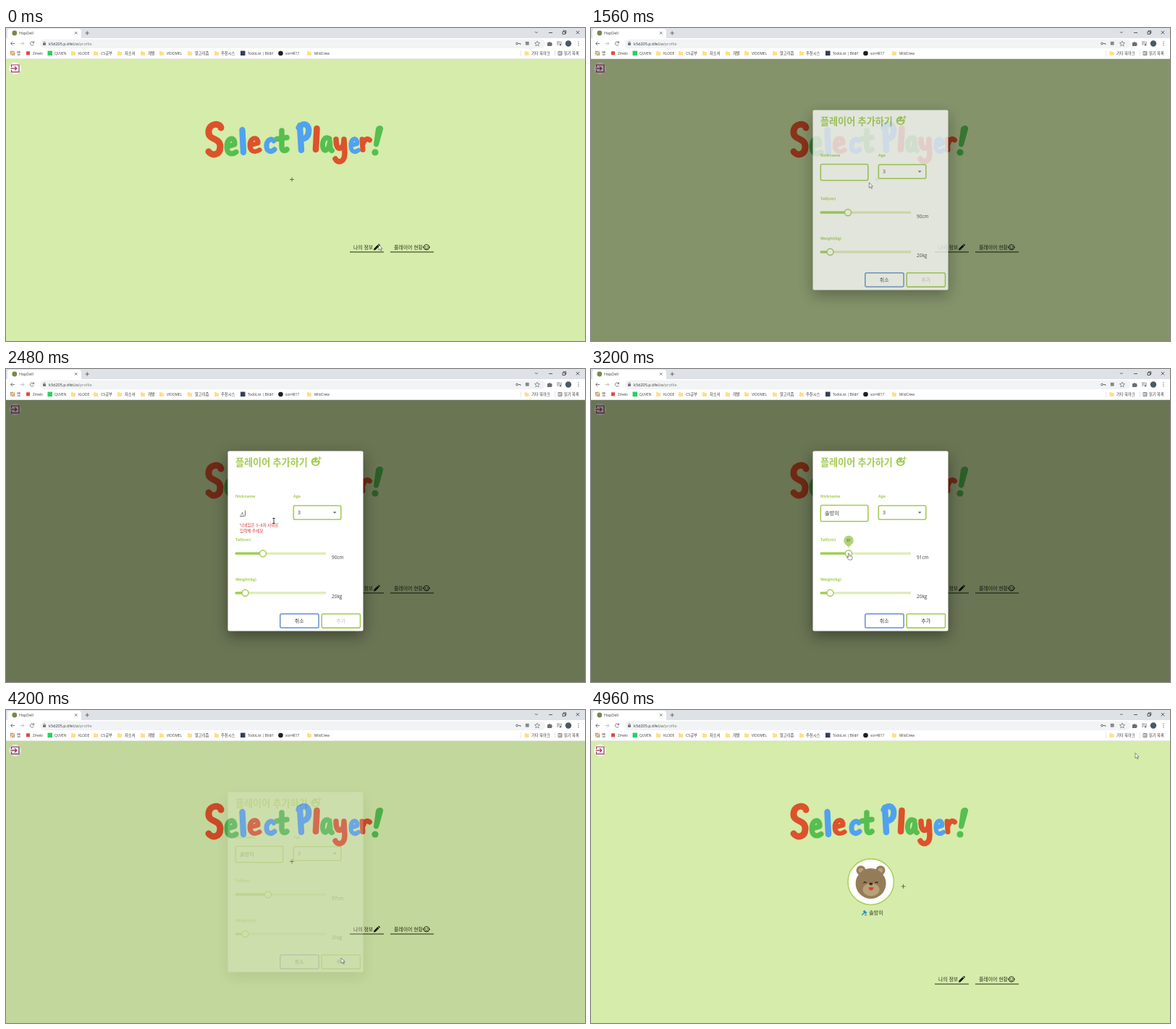
Write an HTML page with a canvas that moves like this. It is 800 px wide and 433 px high and loops after 5 s.

```html
<!DOCTYPE html>
<html lang="ko">
<head>
<meta charset="utf-8">
<title>Select Player</title>
<style>
html, body { margin: 0; width: 100%; height: 100%; overflow: hidden; background: #d5ecaa; }
canvas { display: block; width: 800px; height: 433px; }
</style>
</head>
<body>
<canvas id="stage" width="800" height="433"></canvas>
<script>
const LOOP = 5000, STEP = 40, W = 800, H = 433, TOP = 42.6;
const RED = '#dd522b', GREEN = '#57be50', BLUE = '#50a2ef';
const LIME = '#a2cc52', PALE = '#deecba', INK = '#3c3c3c', GREY = '#6b6f74';
const FONT = '"Open Sans", "Noto Sans CJK KR", "Noto Sans CJK JP", "Noto Sans CJK", sans-serif';
const NICK = '솔방이';

const screen = document.getElementById('stage').getContext('2d');
const layer = document.createElement('canvas');
layer.width = W;
layer.height = H;
const dialogCtx = layer.getContext('2d');
let c = screen;

const clamp = v => Math.max(0, Math.min(1, v));
const ease = v => { v = clamp(v); return v * v * (3 - 2 * v); };
const progress = (t, from, to) => clamp((t - from) / (to - from));

function text(s, x, y, size, color = INK, weight = 400, align = 'left') {
  c.font = `${weight} ${size}px ${FONT}`;
  c.textAlign = align;
  c.fillStyle = color;
  c.fillText(s, x, y);
}
function rect(x, y, w, h, color) { c.fillStyle = color; c.fillRect(x, y, w, h); }
function ellipse(x, y, rx, ry, color) {
  c.beginPath();
  c.ellipse(x, y, rx, ry, 0, 0, 7);
  c.fillStyle = color;
  c.fill();
}
const disc = (x, y, r, color) => ellipse(x, y, r, r, color);
function ring(x, y, r, color, width) {
  c.beginPath();
  c.arc(x, y, r, 0, 7);
  c.strokeStyle = color;
  c.lineWidth = width;
  c.stroke();
}
function stroke(d, color, width, cap = 'butt') {
  c.strokeStyle = color;
  c.lineWidth = width;
  c.lineCap = cap;
  c.lineJoin = cap === 'round' ? 'round' : 'miter';
  c.stroke(new Path2D(d));
}
function fill(d, color) { c.fillStyle = color; c.fill(new Path2D(d)); }
function box(x, y, w, h, radius, fillColor, line, width) {
  c.beginPath();
  c.roundRect(x, y, w, h, radius);
  if (fillColor) { c.fillStyle = fillColor; c.fill(); }
  if (line) { c.strokeStyle = line; c.lineWidth = width; c.stroke(); }
}
function at(x, y, draw, sx = 1, sy = sx) {
  c.save();
  c.translate(x, y);
  c.scale(sx, sy);
  draw();
  c.restore();
}

// Browser window

function folder(x) {
  fill(`M${x} 32h2.4l.8 1h2.8v5h-6z`, '#fbe08a');
}
function drawTabs() {
  rect(0, 0, W, 14, '#dee1e6');
  box(2, 1, 102, 15, [4, 4, 0, 0], '#fff');
  disc(11.8, 7, 3.4, '#76894a');
  text('HopDell', 18, 9.2, 5.3);
  stroke('M95 5.2l3.4 3.4M98.4 5.2l-3.4 3.4', INK, .7);
  stroke('M109.5 7h5.4M112.2 4.3v5.4', INK, .7);
  stroke('M730.8 5l2 2 2-2', INK, .7);
  stroke('M750 6.5h5M769 5h3.5v3.5h-3.5zM770.3 5v-1.2h3.5v3.5h-1.2M787.8 4l4.4 4.4M792.2 4l-4.4 4.4', '#222', .7);
}
function drawToolbar() {
  rect(0, 14, W, TOP - 14, '#fff');
  box(47, 15.5, 698, 12.5, 6, '#f1f3f4');
  stroke('M12 21.5h-5.4M9 19l-2.5 2.5 2.5 2.5', GREY, .9);
  stroke('M19.5 21.5h5.4M22.5 19l2.5 2.5-2.5 2.5', '#b9bcc0', .9);
  stroke('M38.2 20a2.6 2.6 0 1 0 .2 2.6M38.6 18.3v2.3h-2.3', GREY, .9);
  rect(51, 20.8, 4, 3, GREY);
  stroke('M52 21v-1.2a1 1 0 0 1 2 0v1.2', GREY, .7);
  text('k5d205.p.tifel.io', 59, 23.5, 5.5, '#333');
  const hostEnd = 59 + c.measureText('k5d205.p.tifel.io').width;
  text('/profile', hostEnd, 23.5, 5.5, '#7b8085');
  ring(706, 21.5, 1.4, GREY, 1);
  stroke('M707.4 21.5h3.4v1.6', GREY, 1);
  rect(717.8, 18.8, 4.8, 4.8, '#85898d');
  stroke('M734 18l1 2.4 2.6.2-2 1.7.6 2.6-2.2-1.4-2.2 1.4.6-2.6-2-1.7 2.6-.2z', GREY, .7);
  fill('M748 20h2a1 1 0 0 1 2 0h2v1.6a1 1 0 0 1 0 2v1.4h-6z', GREY);
  stroke('M761 19h4.5M761 21h4.5M761 23h2.5M767 18.5v4.2', GREY, .8);
  disc(766, 23.3, 1.2, GREY);
  disc(777, 21.5, 4.2, '#4a5a64');
  for (const y of [19, 21.5, 24]) disc(791, y, .65, GREY);
}
function drawBookmarks() {
  const dots = ['#e6493c', '#4d9b58', '#eeb53c'];
  for (let i = 0; i < 9; i++) rect(6 + i % 3 * 2.2, 31.8 + (i / 3 | 0) * 2.2, 1.6, 1.6, dots[(i + (i / 3 | 0)) % 3]);
  rect(28, 32.3, 5, 5, '#df4b3e');
  rect(57.5, 31.6, 6.5, 6.5, '#2bd060');
  rect(324, 31.6, 6.5, 6.5, '#344058');
  disc(379.5, 35, 3.3, '#1d2024');
  [90, 121, 154, 186, 212, 251, 288, 416, 716.5].forEach(folder);
  [['앱', 15], ['Zmelo', 37], ['QUVEN', 67], ['KLODE', 100], ['CS공부', 131], ['자소서', 164],
   ['개발', 196], ['VIDOMEL', 222], ['알고리즘', 261], ['추천시스', 297], ['TodoList | Bildif', 334],
   ['sori4817', 386], ['MildCrew', 426], ['기타 북마크', 726], ['읽기 목록', 771]]
    .forEach(([label, x]) => text(label, x, 36.9, /[가-힣]/.test(label) ? 5.3 : 4.8));
  rect(711, 31, .6, 8, '#d5d7da');
  rect(758, 31, .6, 8, '#d5d7da');
  stroke('M763 32.5h5v5h-5zM765 32.5v5M766 34.3h2M766 36h2', GREY, .8);
  rect(0, TOP - .6, W, .6, '#dfe2e4');
}

// Page

function letterE(x, y, sx, sy, color) {
  at(x, y, () => stroke('M5 16L15 13C16 3 6 2 4.3 13C3 27 11 28 17 23.5', color, 7.2, 'round'), sx, sy);
}
function drawHeading() {
  const pen = (d, color, width) => stroke(d, color, width, 'round');
  pen('M297 138C296 131 281 131 280 143C279 156 296 151 296 164C296 177 284 177 280 171', RED, 9);
  letterE(301, 148, 1, 1, GREEN);
  pen('M326.5 141L328 172', BLUE, 8.4);
  letterE(333, 148, 1, .88, RED);
  pen('M370 156C366 151 360 156 360 163C360 172 367 172 371 168', BLUE, 7);
  pen('M381 142V164C381 171 386 170 388 168M374.5 153.5L388 151.5', GREEN, 7.5);
  pen('M406 135L408 169M404.5 138C412 128 420 135 418 145C417 152 411 154 408 153', BLUE, 8.4);
  pen('M429.5 139L428 168', RED, 8.6);
  pen('M447 153C440 149 437 157 437.5 163C438 173 446 171 447.5 157L448 164C448.5 170 450 170 450.5 169.5', GREEN, 7);
  pen('M456 154C456 163 458 167 462 166C466 165 467 160 467 154L468 173C468 187 458 187 455 181', RED, 7.5);
  letterE(473, 149, .82, .85, BLUE);
  pen('M492 154L493 168.5M493 161C495 154 499 152 502.5 155', RED, 7);
  fill('M511 139C513 133 522 134 521 140L515 162C513 166 508 165 508 161Z', GREEN);
  disc(510, 172, 4.6, GREEN);
}
function drawLinks(dy) {
  const ink = '#2b321f';
  at(0, dy, () => {
    text('나의 정보', 480, 305.6, 6.9, ink);
    fill('M508 307.5l.5-2.4 5-5 2 2-5 5zM514.1 299.5l1-1 2 2-1 1z', '#151a10');
    rect(475, 309.3, 47, 1.2, '#444c2c');
    text('플레이어 현황', 536, 305.6, 6.9, ink);
    ring(581, 303.3, 3.7, ink, 1);
    ring(577.1, 303.3, .7, ink, .8);
    ring(584.9, 303.3, .7, ink, .8);
    disc(579.6, 302.6, .7, ink);
    disc(582.4, 302.6, .7, ink);
    stroke('M579 304.6q2 1.8 4 0', ink, .8);
    rect(531, 309.3, 60, 1.2, '#444c2c');
  });
}
function drawPlus(x, y) {
  stroke(`M${x - 3} ${y}h6M${x} ${y - 3}v6`, '#48533a', .8);
}
function drawBear() {
  const fur = '#957c59', soft = '#b8a078';
  disc(386.7, 237.7, 31.7, '#fff');
  ring(386.7, 237.7, 31.7, '#a5cf4c', 1.4);
  for (const x of [373, 400]) {
    disc(x, 221.8, 6.5, fur);
    disc(x, 221.8, 3.4, soft);
  }
  disc(386.6, 240, 21, fur);
  ellipse(387, 248.5, 11.5, 9, soft);
  ellipse(386.8, 240.6, 2.6, 1.8, '#3a2c21');
  stroke('M376.5 239.5q2-3 4 0M392.5 239.5q2-3 4 0', '#33271e', 1.3);
  fill('M383.5 245.2h7q-.5 4.2-3.5 4.2t-3.5-4.2z', '#d83f32');
}
function drawPlayer() {
  drawBear();
  stroke('M374.3 283.7l4.2-4.2', '#2e8bc2', 1.3);
  fill('M375.8 278.8l2-2 3.6 3.6-2 2z', '#2e8bc2');
  rect(377.8, 283.2, 3.5, 1, '#2e8bc2');
  text(NICK, 384, 282.7, 7.2, '#2b321f');
}
function drawPage(t) {
  const added = t >= 4600;
  rect(0, TOP, W, H - TOP, '#d5ecaa');
  disc(12.5, 56, 8.3, '#fff');
  stroke('M7.5 54v-3h10.5v9.8h-10.5v-3', '#9b2f54', 1.2);
  stroke('M6.5 55.9h8M12 53.2l2.7 2.7-2.7 2.7', '#9b2f54', 1.2);
  drawHeading();
  if (added) drawPlayer();
  drawPlus(added ? 431.5 : 395, added ? 244 : 209.5);
  drawLinks(added ? 69.2 : 0);
}

// Dialog

const typing = [[2400, 'ㅅ'], [2520, '소'], [2580, '솔'], [2660, '솔ㅂ'], [2720, '솔바'], [2780, '솔방'], [2860, '솔방ㅇ'], [2920, NICK]];
function typedText(t) {
  let value = '';
  for (const [time, s] of typing) if (t >= time) value = s;
  return value;
}
function slider(y, x) {
  rect(317, y - 1.6, 125, 3.2, PALE);
  box(316.5, y - 1.6, x - 316.5, 3.2, 1.5, LIME);
  disc(x, y, 4.5, '#fff');
  ring(x, y, 4.5, LIME, 1.4);
}
function bubble(x, y, value) {
  fill(`M${x} ${y + 9.2}L${x - 5} ${y + 4.3}A6.8 6.8 0 1 1 ${x + 5} ${y + 4.3}Z`, '#b4d37c');
  text(value, x, y + 1.8, 5, INK, 400, 'center');
}
function drawNameField(t) {
  const value = typedText(t), focused = t >= 1960 && t < 3080;
  if (!focused) box(317.3, 188.5, 65.5, 22.3, 2, null, LIME, 1.6);
  text(value, 323, 202.3, 7.2);
  if (focused) {
    const end = 323 + c.measureText(value).width;
    if (value) rect(323, 203.3, end - 323, .8, INK);
    if (value || t % 1000 < 500) rect(end + .5, 195.5, .7, 8, INK);
  }
  if (value && value.length < 3) {
    text('닉네임은 3~8자 사이로', 323, 218.3, 5.6, '#d6333a');
    text('입력해 주세요.', 323, 226.2, 5.6, '#d6333a');
  }
}
function drawDialog(t) {
  c = dialogCtx;
  c.clearRect(0, 0, W, H);
  c.save();
  c.shadowColor = 'rgba(0,0,0,.4)';
  c.shadowBlur = 20;
  c.shadowOffsetY = 7;
  box(306.5, 113.5, 187, 249, 2, '#fff');
  c.restore();

  text('플레이어 추가하기', 317, 134, 13.1, LIME, 700);
  disc(427.7, 128.2, 6, LIME);
  disc(425.4, 126.6, 1, '#fff');
  disc(429.8, 126.6, 1, '#fff');
  fill('M424 129.3h7.4q-1 3.2-3.7 3.2t-3.7-3.2z', '#fff');
  disc(433.3, 123.5, 3, '#fff');
  stroke('M431 123.5h4.8M433.4 121.1v4.8', LIME, 1.2);

  [['Nickname', 317, 178], ['Age', 397, 178], ['Tall(cm)', 317, 238], ['Weight(kg)', 317, 292.5]]
    .forEach(([label, x, y]) => text(label, x, y, 5.4, LIME, 700));
  drawNameField(t);
  box(397.3, 189, 65.5, 19.3, 2, null, LIME, 1.6);
  text('3', 403, 201.2, 7);
  fill('M451.8 197.6h4.8l-2.4 2.5z', '#666');

  const tall = 90 + Math.round(7 * ease(progress(t, 3120, 3400)));
  const tallX = 355 + tall - 90;
  slider(255.2, tallX);
  text(tall + 'cm', 450, 262.5, 6.5);
  if (t >= 3060 && t < 3440) bubble(tallX, 237.5, tall);
  slider(309.8, 330.5);
  text('20kg', 450, 317, 6.5);
  if (t >= 3560 && t < 3880) bubble(330.5, 292.2, 20);

  box(378.8, 338.7, 53.3, 19.4, 2, null, '#6690d0', 1.5);
  text('취소', 405.3, 350.8, 7, INK, 400, 'center');
  box(436.2, 338.7, 53.3, 19.4, 2, null, LIME, 1.6);
  text('추가', 462.8, 350.8, 7, t >= 2920 ? INK : '#c3c3c3', 400, 'center');
  c = screen;
}
function dialogOpacity(t) {
  return t < 4000 ? 1 - (1 - progress(t, 1480, 1680)) ** 2.8 : 1 - ease(progress(t, 4080, 4245));
}

// Pointer

const route = [[0, 515, 300], [240, 558, 302], [660, 14, 56], [800, 14, 57], [1040, 170, 91],
  [1340, 394, 208], [1480, 394, 208], [1600, 381, 216], [1900, 370, 209], [2960, 370, 209],
  [3080, 354, 255], [3120, 354, 255], [3400, 361, 255], [3580, 332, 309], [3800, 336, 312],
  [3840, 336, 312], [4020, 463, 343], [4320, 463, 343], [4920, 752, 59.5], [5000, 752, 59.5]];
function pointerAt(t) {
  const i = Math.max(1, route.findIndex(p => p[0] >= t));
  const [t0, x0, y0] = route[i - 1], [t1, x1, y1] = route[i];
  const k = ease(progress(t, t0, t1));
  return [x0 + (x1 - x0) * k, y0 + (y1 - y0) * k];
}
function drawPointer(t) {
  const [x, y] = pointerAt(t);
  const shape = t >= 1880 && t < 3020 ? 'beam' : t >= 3060 && t < 3900 ? 'hand' : 'arrow';
  at(x, y, () => {
    if (shape === 'beam') {
      stroke('M-1.7-2.5h3.4M0-2.5v7M-1.7 4.5h3.4', '#222', .9);
      return;
    }
    const d = shape === 'hand'
      ? 'M0 0Q1-.8 1.5.5V3.3L5 4Q6 4.5 5.7 6L5 9H.8L-1.9 5.8Q-1.8 4.5-.5 5.3L0 5.7Z'
      : 'M0 0V7.2L1.7 5.7 2.9 8.3 4.1 7.7 2.9 5.2H5.1Z';
    fill(d, '#fff');
    stroke(d, '#444', .6);
  });
}

function draw(t) {
  drawPage(t);
  const opacity = dialogOpacity(t);
  if (opacity > 0) {
    rect(0, TOP, W, H - TOP, `rgba(0,0,0,${opacity / 2})`);
    drawDialog(t);
    c.globalAlpha = opacity;
    c.drawImage(layer, 0, 0);
    c.globalAlpha = 1;
  }
  drawTabs();
  drawToolbar();
  drawBookmarks();
  drawPointer(t);
}

const start = performance.now();
function tick() {
  const t = (performance.now() - start) % LOOP;
  draw(Math.floor(t / STEP) * STEP);
  requestAnimationFrame(tick);
}
tick();
</script>
</body>
</html>
```
